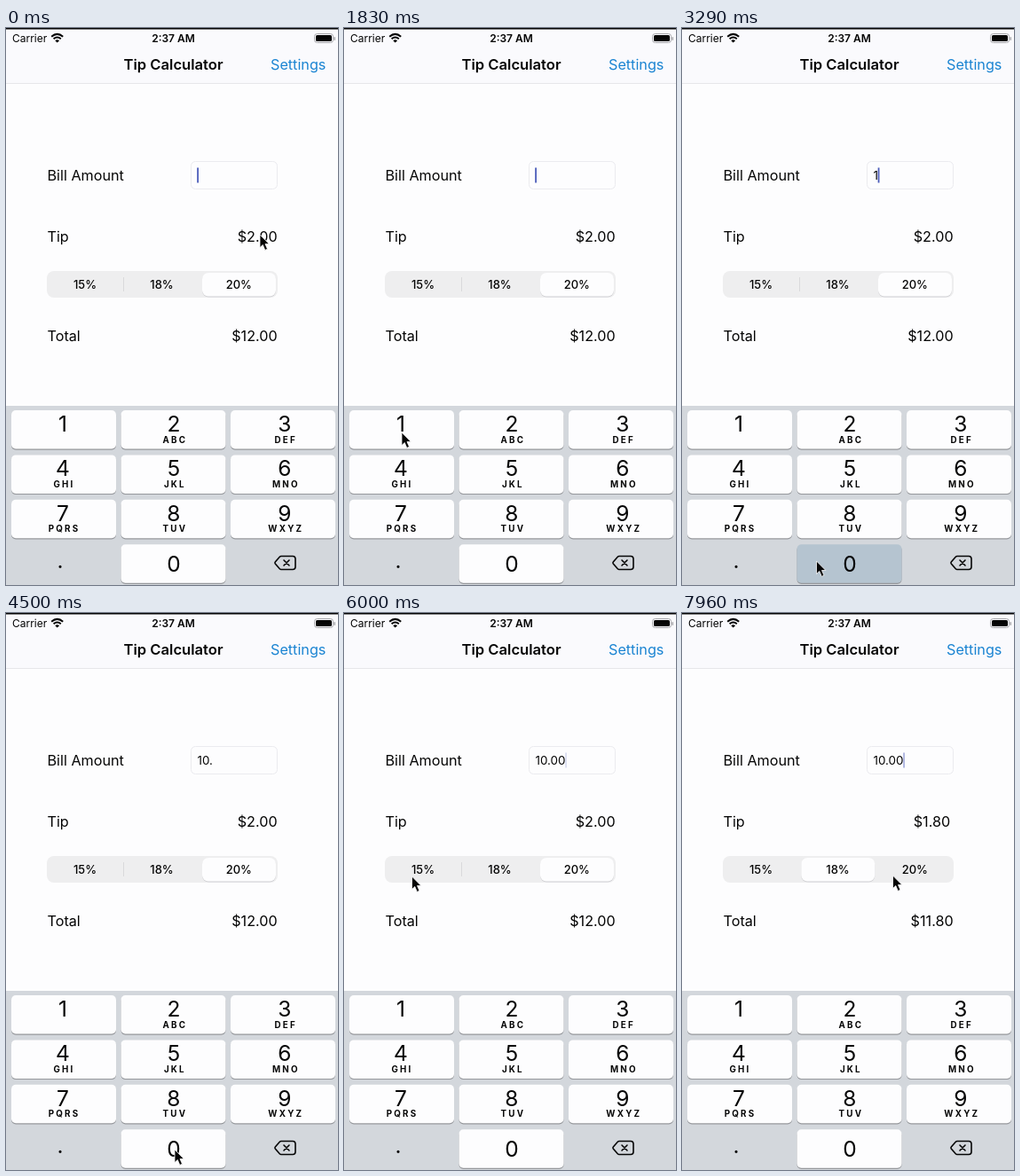
Recreate the animation shown at these times as an HTML page. Size 374x628 px, loop 8000 ms.

```html
<!DOCTYPE html>
<html lang="en">
<head>
<meta charset="utf-8">
<title>Tip Calculator</title>
<style>
  html, body { margin: 0; width: 100%; height: 100%; overflow: hidden; background: #fdfdfe; }
  svg { display: block; width: 100vw; height: 100vh; font-family: Inter, Roboto, sans-serif; fill: #050505; }
  .label { font-size: 16.2px; }
  .status { font-size: 12px; }
  .semibold { font-weight: 600; }
  .segment { font-size: 13px; font-weight: 500; text-anchor: middle; }
  .entry { font-size: 13.4px; }
  .digit { font-size: 24.5px; text-anchor: middle; }
  .letters { font-size: 9.8px; font-weight: 700; letter-spacing: 2.2px; text-anchor: middle; }
  .middle { text-anchor: middle; }
  .end { text-anchor: end; }
  .key { fill: #fdfdfe; }
  .key.pressed { fill: #b5c4d0; }
</style>
</head>
<body>
<svg viewBox="0 0 374 628" preserveAspectRatio="none">
  <rect width="374" height="628" fill="#fdfdfe"/>
  <rect width="374" height="62" fill="#fafafd"/>
  <rect width="374" height="1.5" fill="#050505"/>
  <path d="M0 62.5H374" stroke="#e6e6ea"/>

  <text class="status" x="7" y="16">Carrier</text>
  <g fill="none" stroke="#050505" stroke-width="2">
    <path d="M51.2 9.8Q57.7 4 64.2 9.8M53.6 12.3Q57.7 8.8 61.8 12.3"/>
  </g>
  <path d="M55.3 14.2Q57.7 12.4 60.1 14.2L57.7 16.6Z"/>
  <text class="status semibold middle" x="188.5" y="16">2:37 AM</text>
  <rect x="347.5" y="6.5" width="21" height="10" rx="3" fill="none" stroke="#a8a8ac"/>
  <rect x="349" y="8" width="18" height="7" rx="1.6"/>
  <rect x="369.5" y="10" width="1.5" height="4" rx=".7" fill="#a8a8ac"/>

  <text class="semibold middle" font-size="16.6" x="188.5" y="47">Tip Calculator</text>
  <text class="label" x="298" y="47" fill="#1a84d2">Settings</text>

  <text class="label" x="46.5" y="172">Bill Amount</text>
  <rect x="208.5" y="150.5" width="97" height="31" rx="5" fill="#fdfdfe" stroke="#ebebef"/>
  <text class="entry" id="entry" x="215.5" y="171"></text>
  <rect id="caret" y="157.5" width="1.8" height="17" fill="#4c5cba"/>

  <text class="label" x="46.5" y="241">Tip</text>
  <text class="label" id="tip" x="260.7" y="241"></text>
  <rect x="46" y="274" width="260" height="30" rx="8" fill="#eeeeef"/>
  <path id="leftDivider" d="M132.5 281V297" stroke="#d9d9dc"/>
  <path id="rightDivider" d="M218.5 281V297" stroke="#d9d9dc"/>
  <g id="thumb">
    <rect y="277" width="83" height="26.5" rx="7" fill="#d2d2d5"/>
    <rect y="276" width="83" height="26.5" rx="7" fill="#fdfdfe"/>
  </g>
  <text class="segment" x="89" y="293.5">15%</text>
  <text class="segment" x="175.5" y="293.5">18%</text>
  <text class="segment" x="262.3" y="293.5">20%</text>
  <text class="label" x="46.5" y="353">Total</text>
  <text class="label end" id="total" x="305.7" y="353"></text>

  <rect y="426" width="374" height="202" fill="#d3d7dc"/>
  <g id="keys"></g>
  <text class="digit" x="61" y="608.5">.</text>
  <g fill="none" stroke="#050505" stroke-width="1.6" stroke-linecap="round" stroke-linejoin="round">
    <path d="M310 595.5H323Q326 595.5 326 598.5V607.5Q326 610.5 323 610.5H310Q309 610.5 308.3 609.8L303.3 604Q302.5 603 303.3 602L308.3 596.2Q309 595.5 310 595.5Z"/>
    <path d="M313 600L319 606M319 600L313 606"/>
  </g>

  <path id="pointer" d="M0 0V14.6L3.3 11.5L5.8 17.4L8.5 16.2L6 10.5H10.4Z" stroke="#fdfdfe" stroke-width=".8"/>
</svg>
<script>
  const LOOP = 8000;
  const $ = id => document.getElementById(id);
  const clamp = v => Math.min(1, Math.max(0, v));
  const ease = v => v * v * (3 - 2 * v);

  // [time, x, y]
  const pointerPath = [
    [0, 286, 233], [450, 286, 233], [1600, 65, 456], [2060, 65, 456],
    [2450, 151.5, 601], [3400, 151.5, 601], [3640, 58, 600], [3780, 58, 600],
    [4130, 181, 603], [4400, 190, 605], [5470, 190, 605], [5980, 76.5, 297],
    [6700, 76.5, 297], [7120, 167.5, 296], [7640, 167.5, 296], [7940, 237.5, 296]
  ];
  const entries = [[0, ''], [2010, '1'], [3400, '10'], [3900, '10.'], [4810, '10.0'], [5460, '10.00']];
  const presses = [['1', 1880, 2010], ['0', 3280, 3400], ['0', 4670, 4810], ['0', 5310, 5460]];
  const choices = [
    { at: 0, x: 221, tip: 2, left: 1, right: 0 },
    { at: 6460, x: 47.3, tip: 1.5, left: 0, right: 1 },
    { at: 7380, x: 134.3, tip: 1.8, left: 0, right: 0 }
  ];
  const SLIDE = 280;

  const keys = {};
  const letters = ['', 'ABC', 'DEF', 'GHI', 'JKL', 'MNO', 'PQRS', 'TUV', 'WXYZ'];

  function addKey(digit, column, row, caption, digitY) {
    const x = 6 + column * 123.5, y = 431 + row * 50.4, center = 64 + column * 124.9;
    $('keys').insertAdjacentHTML('beforeend', `
      <rect x="${x}" y="${y + 1.2}" width="118" height="43.5" rx="5" fill="#96989c"/>
      <rect class="key" id="key${digit}" x="${x}" y="${y}" width="118" height="43.5" rx="5"/>
      <text class="digit" x="${center}" y="${y + digitY}">${digit}</text>
      <text class="letters" x="${center + 1.5}" y="${y + 36.5}">${caption}</text>`);
    keys[digit] = $('key' + digit);
  }
  letters.forEach((caption, i) => addKey(i + 1, i % 3, Math.floor(i / 3), caption, 24));
  addKey(0, 1, 3, '', 30.3);

  const lastIndex = (list, test) => list.reduce((found, item, i) => test(item) ? i : found, 0);

  function pointerAt(t) {
    const i = lastIndex(pointerPath, p => p[0] <= t);
    const a = pointerPath[i], b = pointerPath[i + 1] || a;
    const k = a === b ? 0 : ease((t - a[0]) / (b[0] - a[0]));
    return [a[1] + (b[1] - a[1]) * k, a[2] + (b[2] - a[2]) * k];
  }

  // Solid, quick fade out, quick fade in; restarts after each typed character.
  function caretOpacity(elapsed) {
    const phase = elapsed % 1000;
    return phase < 600 ? 1 - clamp((phase - 420) / 150) : clamp((phase - 600) / 100);
  }

  function draw(t) {
    const [x, y] = pointerAt(t);
    $('pointer').setAttribute('transform', `translate(${x} ${y})`);

    const [typedAt, text] = entries[lastIndex(entries, e => e[0] <= t)];
    const entry = $('entry');
    if (entry.textContent !== text) entry.textContent = text;
    $('caret').setAttribute('x', 215.2 + (text ? entry.getComputedTextLength() : 0));
    $('caret').setAttribute('opacity', caretOpacity(t - typedAt));

    for (const digit in keys) {
      const pressed = presses.some(([d, from, to]) => d === digit && t >= from && t < to);
      keys[digit].classList.toggle('pressed', pressed);
    }

    const i = lastIndex(choices, c => c.at <= t);
    const now = choices[i], before = choices[i - 1] || now;
    const k = ease(clamp((t - now.at) / SLIDE));
    const mix = name => before[name] + (now[name] - before[name]) * k;
    $('thumb').setAttribute('transform', `translate(${mix('x')} 0)`);
    $('leftDivider').setAttribute('opacity', mix('left'));
    $('rightDivider').setAttribute('opacity', mix('right'));
    $('tip').textContent = '$' + now.tip.toFixed(2);
    $('total').textContent = '$' + (10 + now.tip).toFixed(2);
  }

  let start;
  function tick(time) {
    start ??= time;
    draw((time - start) % LOOP);
    requestAnimationFrame(tick);
  }
  draw(0);
  requestAnimationFrame(tick);
</script>
</body>
</html>
```
